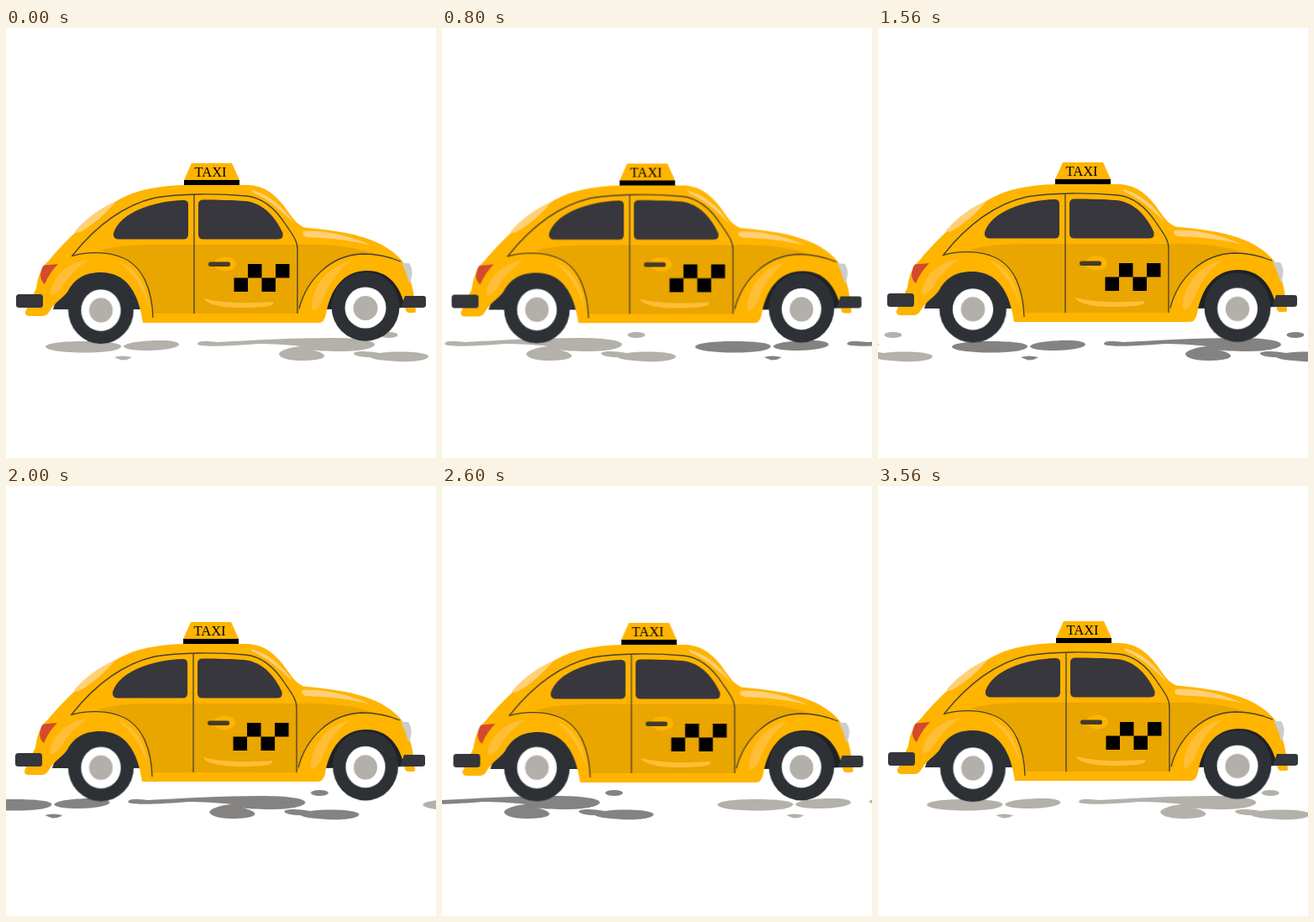
Recreate the animation shown at these times as an HTML page. Size 512x512 px, loop 3.6 s.

```html
<!DOCTYPE html>
<html lang="en">
<head>
<meta charset="utf-8">
<title>Taxi ride</title>
<style>
  html, body { margin: 0; width: 100%; height: 100%; overflow: hidden; background: #fff; }
  svg { display: block; width: 100vw; height: 100vh; }

  #road { animation: road 3.6s steps(90, end) infinite; }
  #car { animation: sway 3.6s linear infinite; }
  .wheel { transform-box: fill-box; transform-origin: center; }
  #rear { animation: rear .6s linear infinite; }
  #front { animation: front .6s linear infinite; }

  @keyframes road { to { transform: translateX(-1011px); } }
  @keyframes sway {
    0%, 100% { transform: translate(0, 0); }
    13.333% { transform: translate(0, 2px); }
    31.111%, 47.778% { transform: translate(-1px, -1px); }
    55.556% { transform: translate(-1px, 1px); }
    72.222% { transform: translate(1.5px, 2px); }
    83.333% { transform: translate(.5px, 0); }
    88.889% { transform: translate(0, -2px); }
    94.444% { transform: translate(0, -1px); }
    98.889% { transform: translate(0, 0); }
  }
  @keyframes rear {
    0%, 93%, 100% { transform: translateY(1.5px) scale(.963, 1.01); }
    33.333% { transform: translateY(.8px) scale(.966, 1.01); }
    78% { transform: none; }
  }
  @keyframes front {
    0%, 87%, 100% { transform: none; }
    33.333%, 45% { transform: translateY(1.5px) scale(.963, 1.01); }
  }

  .line { fill: none; stroke: #45402f; stroke-width: 1.3; }
  .dark { fill: #38373d; }
  .well { fill: #1f2225; }
  .tyre { fill: #2d3136; }
  .paint { fill: #ffb400; }
  .shade { fill: #e9a500; }
  .glow { fill: #ffbe35; }
  .shine { fill: #ffd078; }
  .sign { font: 16.5px "Liberation Serif", "Times New Roman", serif; }
</style>
</head>
<body>
<svg viewBox="0 0 512 512">
  <defs>
    <g id="puddles">
      <path d="M47 379.500C48 375 70 373 92 373C118 373 137 375 137 379C137 384 117 386.500 94 386.500C69 386.500 48 384 47 379.500Z"/>
      <path d="M140 379C143 374 167 372 184 372C199 372 206 374 206 377C205 381 186 384 169 384C152 384 140 382 140 379Z"/>
      <path d="M129 392Q138 389 150 392Q145 395.500 138 395.500Q134 394 129 392Z"/>
      <path d="M228 376C229 372 239 373 251 374C290 372 340 369 387 369C418 369 440 372 439 377C438 382 419 385 399 385C382 385 367 384 363 383C373 385 380 388 379 391C377 395 363 396 350 396C335 396 325 392 325 388C326 384 338 380 351 379C335 377 315 376 300 376C275 378 228 381 228 376Z"/>
      <path d="M414 387C418 384 433 385 445 387C468 384 503 386 503 391C503 396 482 398 466 397C446 396 436 394 433 392C424 392 413 390 414 387Z"/>
      <ellipse cx="456" cy="365.500" rx="10.500" ry="3.400"/>
    </g>
  </defs>

  <g id="road">
    <use href="#puddles" fill="#b4b0aa"/>
    <use href="#puddles" x="479" fill="#848382"/>
    <use href="#puddles" x="1011" fill="#b4b0aa"/>
  </g>

  <g id="car">
    <!-- wheel wells -->
    <path class="tyre" d="M56 335C65 304 88 289 113 289C140 289 158 305 162 335Z"/>
    <path class="well" d="M380 335C386 304 404 286 430 286C458 286 474 305 480 333Z"/>

    <!-- shell -->
    <path class="paint" d="M23 338L36 310C38 294 43 284 51 277C72 251 104 222 135 204C155 193 180 188 212 187H285C305 187 316 195 326 206C338 219 342 232 355 237.500C381 240 408 243 431 251C448 257 463 266 473 279C481 295 486 312 488 337Q488 339 485 339H479Q477 339 476 336C470 306 455 289 430 289C401 289 386 312 381 341Q379 351 372 351H163C158 316 144 291 113 291C92 291 81 300 74 313C68 322 58 326 52 337Q49 343 43 343H29Q22 343 23 338Z"/>
    <path class="shade" d="M110 265C130 259 155 258 180 258H347V340H175C174 311 163 281 136 271C128 268 118 267 110 265Z"/>
    <path class="shade" d="M347 258C382 257 414 260 438 269C398 265 361 291 350 336L347 339Z"/>

    <!-- highlights -->
    <path class="shine" d="M82 242C94 228 112 214 131 206.500C119 221 104 234 90 242Q84 245 82 242Z"/>
    <path class="shine" d="M293 193C313 198 332 214 343 233C328 217 311 203 296 197Q292 194 293 193Z"/>
    <path class="shine" d="M354 242C379 240 413 248 435 259C409 252 383 250 358 249Q351 247 354 242Z"/>
    <path class="glow" d="M53 315C56 296 73 279 98 276C84 286 75 295 67 309Q54 324 53 315Z"/>
    <path class="glow" d="M364 333C364 309 382 284 410 278C396 288 386 302 380 317C374 333 365 341 364 333Z"/>
    <path class="glow" d="M134 278C156 286 167 306 170 332C163 311 153 293 134 278Z"/>
    <path class="glow" d="M236 322C258 328 290 328 318 326Q320 329 313 331C286 335 240 334 236 322Z"/>

    <!-- seams -->
    <path class="line" d="M79 271C106 237 139 211 178 202C207 197 252 197 286 200C307 202 322 217 333 234C342 247 347 254 347 263V340M224 198V340"/>
    <path class="line" d="M78 271.500C97 266 122 266 140 274C164 285 174 313 175 345"/>
    <path class="line" d="M349 334C358 300 386 270 425 269C443 269 458 273 470 278"/>

    <!-- windows -->
    <path class="dark" d="M128 244C136 219 177 206 211 205Q217 205 217 210V246Q217 251.500 211 251.500H133Q127 251 128 244Z"/>
    <path class="dark" d="M229 210Q229 204.500 235 204.500C251 204.500 270 205 284 206C308 208 322 228 329.500 244Q331 251.500 324 251.500H235Q229 251.500 229 246Z"/>

    <!-- door -->
    <ellipse class="paint" cx="261" cy="281" rx="13" ry="8.500"/>
    <rect x="241" y="278.500" width="26" height="5.500" rx="2.500" fill="#453b2b"/>
    <path d="M288 281h16.500v16.500h-16.500zM321 281h16.500v16.500h-16.500zM271.500 297.500h16.500v16.500h-16.500zM304.500 297.500h16.500v16.500h-16.500z"/>

    <!-- lights and bumpers -->
    <path fill="#d34a2c" d="M45 282.500L62 281Q52 291 46 305Q41 301 41 294Q42 286 45 282.500Z"/>
    <path fill="#cbcccd" d="M471 280H480Q484 286 483.500 293Q483 300 480 304Q477 291 471 280Z"/>
    <rect x="12" y="317" width="32" height="16" rx="3.500" fill="#34363c"/>
    <path fill="#34363c" d="M470 333Q473 325 475 319H497Q500 319 500 322V330Q500 333 496 333Z"/>

    <!-- roof sign -->
    <path class="paint" d="M221 161H269L278 181H212Z"/>
    <rect x="212" y="181" width="66" height="6"/>
    <text class="sign" x="224.500" y="177">TAXI</text>
  </g>

  <g id="rear" class="wheel">
    <ellipse class="tyre" cx="113" cy="334" rx="40.500" ry="40.200"/>
    <circle cx="113" cy="334.500" r="24.500" fill="#fff"/>
    <circle cx="113" cy="334.500" r="14.500" fill="#b3afaa"/>
  </g>
  <g id="front" class="wheel">
    <ellipse class="tyre" cx="428" cy="331.700" rx="40.500" ry="41"/>
    <circle cx="428" cy="333" r="24.500" fill="#fff"/>
    <circle cx="428" cy="333.500" r="14.500" fill="#b3afaa"/>
  </g>
</svg>
</body>
</html>
```
